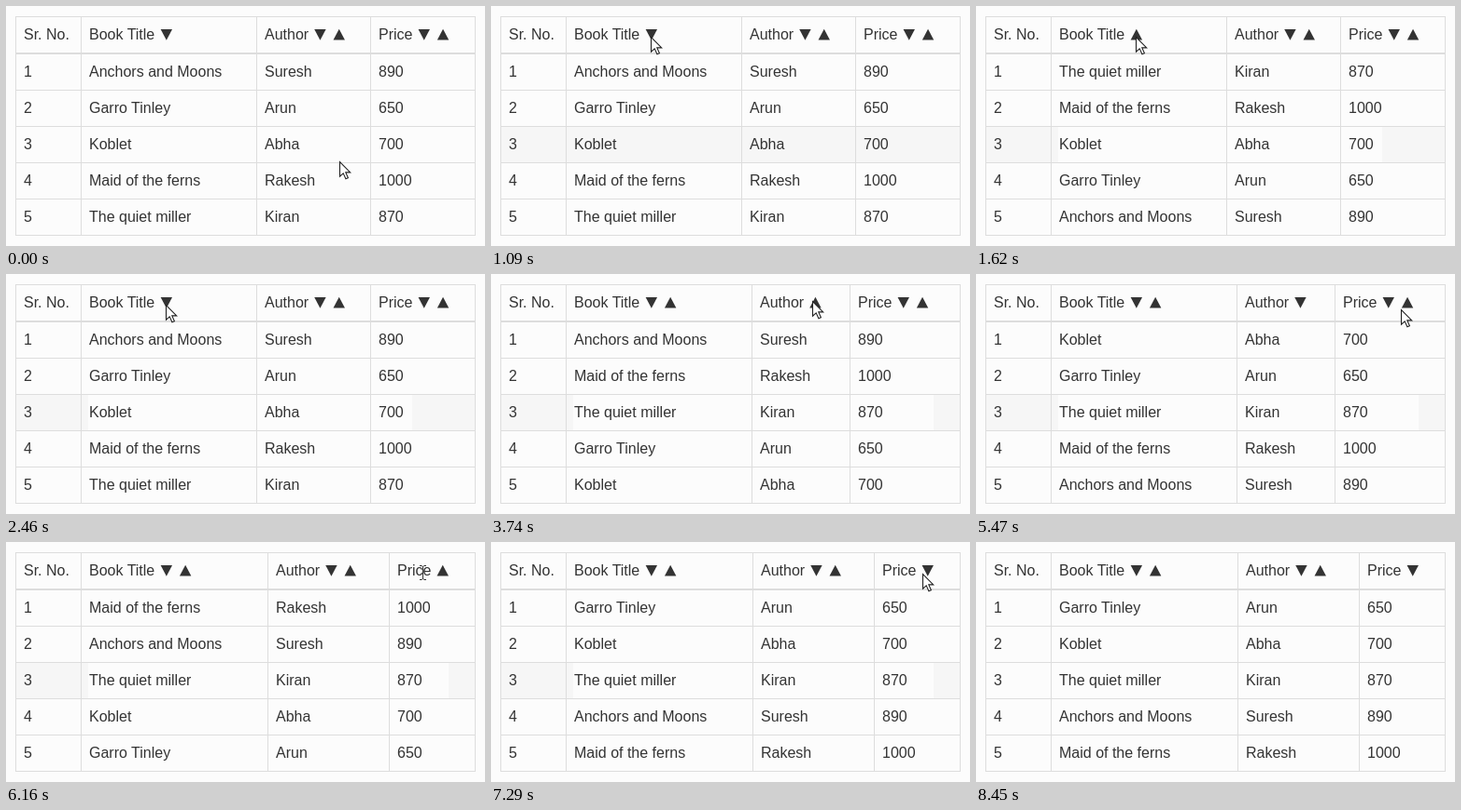
Write an HTML page that moves like this. It is 513x258 px and loops after 8750 ms.

```html
<!DOCTYPE html>
<html lang="en">
<head>
<meta charset="utf-8">
<title>Sortable book table</title>
<style>
  html, body { margin: 0; width: 100%; height: 100%; overflow: hidden; background: #fcfcfc; }
  svg { display: block; }
  text { font: 16px "Liberation Sans", Arial, sans-serif; fill: #333; cursor: default; }
</style>
</head>
<body>
<svg width="513" height="258" viewBox="0 0 513 258">
  <g id="shade"></g>
  <g id="table"></g>
  <path id="arrow" d="M.5.5V16.2L4.2 12.8L6.9 18.8L9.4 17.7L6.8 11.9H11.7Z" fill="#fff" stroke="#222" stroke-width="1.1"/>
  <path id="beam" d="M-3 -7.5H-1L.5 -6.5L2 -7.5H4M.5 -6.5V6.5M-3 7.5H-1L.5 6.5L2 7.5H4" fill="none" stroke="#333"/>
</svg>
<script>
const LOOP = 8750;
const PAGE = '#fcfcfc', HOVER = '#f6f6f6', LINE = '#ddd', INK = '#333';
const HEADS = ['Sr. No.', 'Book Title', 'Author', 'Price'];
const BOOKS = [
  ['Anchors and Moons', 'Suresh', 890],
  ['Garro Tinley', 'Arun', 650],
  ['Koblet', 'Abha', 700],
  ['Maid of the ferns', 'Rakesh', 1000],
  ['The quiet miller', 'Kiran', 870]
];
// Inner column borders depend on which column is sorted
const EDGES = { 1: [268, 390], 2: [279, 384], 3: [280, 410] };

// time, sorted column, direction
const VIEWS = [
  [0, 1, 1], [1620, 1, -1], [2460, 1, 1], [3740, 2, -1],
  [4770, 2, 1], [6040, 3, -1], [7290, 3, 1]
];
// time, x, y, pointer kind
const MOVES = [
  [0, 357, 167, 'arrow'],
  [430, 347, 152, 'arrow'], [560, 303, 112, 'arrow'], [690, 246, 72, 'arrow'],
  [820, 201, 46, 'arrow'], [960, 178, 35, 'arrow'], [1090, 171, 33, 'arrow'],
  [2740, 199, 30, 'arrow'], [2890, 271, 24, 'arrow'], [3040, 332, 27, 'arrow'], [3190, 344, 29, 'arrow'],
  [4310, 345, 31, 'arrow'],
  [5040, 358, 35, 'arrow'], [5180, 402, 39, 'arrow'], [5320, 465, 40, 'arrow'],
  [5470, 455, 38, 'arrow'], [5610, 449, 35, 'arrow'], [5770, 446, 33, 'arrow'],
  [6160, 446, 33, 'beam'], [6620, 452, 33, 'beam'], [6750, 459, 33, 'arrow'], [6890, 462, 34, 'arrow'],
  [7720, 463, 40, 'arrow'], [7860, 468, 75, 'arrow'], [8010, 478, 135, 'arrow'],
  [8150, 489, 200, 'arrow'], [8300, 497, 250, 'arrow'], [8450, 0, 0, 'none']
];
// time, shaded row (-1 for none), unshaded span from x 88 to this x
const SHADES = [
  [0, -1, 0], [430, 2, 0], [1620, 2, 435], [3740, 2, 474],
  [7720, -1, 0], [7860, 0, 0], [8010, 2, 0], [8150, 3, 0], [8300, -1, 0]
];

const $ = id => document.getElementById(id);
const rowTop = i => 51 + 39 * i;
const rect = (x, y, w, h, fill) => `<rect x="${x}" y="${y}" width="${w}" height="${h}" fill="${fill}"/>`;
const label = (x, y, s) => `<text x="${x}" y="${y}">${s}</text>`;
const at = (steps, t) => steps.findLast(step => step[0] <= t);

const ruler = document.createElement('canvas').getContext('2d');
ruler.font = '16px "Liberation Sans", Arial, sans-serif';

function triangle(x, down) {
  const [base, tip] = down ? [25, 36.7] : [36.5, 24.8];
  return `<path d="M${x - 6.2} ${base}H${x + 6.2}L${x} ${tip}Z" fill="${INK}"/>`;
}

function header(name, i, x, col, dir) {
  let out = label(x, 36, name);
  if (!i) return out;
  const mid = x + ruler.measureText(name).width + 12.3;
  if (i === col) return out + triangle(mid, dir > 0);
  return out + triangle(mid, true) + triangle(mid + 20.3, false);
}

function drawTable([, col, dir]) {
  const edges = [10, 80, ...EDGES[col], 502];
  let out = edges.map(x => rect(x, 11, 1, 236, LINE)).join('');
  out += rect(10, 11, 493, 1, LINE) + rect(10, 50, 493, 2, LINE);
  out += HEADS.map((name, i) => header(name, i, edges[i] + 9, col, dir)).join('');

  const rows = [...BOOKS].sort((a, b) => (a[col - 1] < b[col - 1] ? -dir : dir));
  rows.forEach((book, r) => {
    out += rect(10, rowTop(r + 1), 493, 1, LINE);
    out += [r + 1, ...book].map((cell, i) => label(edges[i] + 9, rowTop(r) + 25, cell)).join('');
  });
  $('table').innerHTML = out;
}

function drawShade([, row, gapEnd]) {
  let out = '';
  if (row >= 0) {
    out = rect(11, rowTop(row), 491, 39, HOVER);
    if (gapEnd) out += rect(88, rowTop(row), gapEnd - 88, 39, PAGE);
  }
  $('shade').innerHTML = out;
}

function drawPointer([, x, y, kind]) {
  for (const id of ['arrow', 'beam']) {
    $(id).setAttribute('display', id === kind ? 'inline' : 'none');
    $(id).setAttribute('transform', `translate(${x} ${y})`);
  }
}

const tracks = [
  { steps: SHADES, draw: drawShade },
  { steps: VIEWS, draw: drawTable },
  { steps: MOVES, draw: drawPointer }
];
const start = performance.now();

function tick() {
  const t = (performance.now() - start) % LOOP;
  for (const track of tracks) {
    const step = at(track.steps, t);
    if (step !== track.shown) track.draw(track.shown = step);
  }
  requestAnimationFrame(tick);
}
tick();
</script>
</body>
</html>
```
